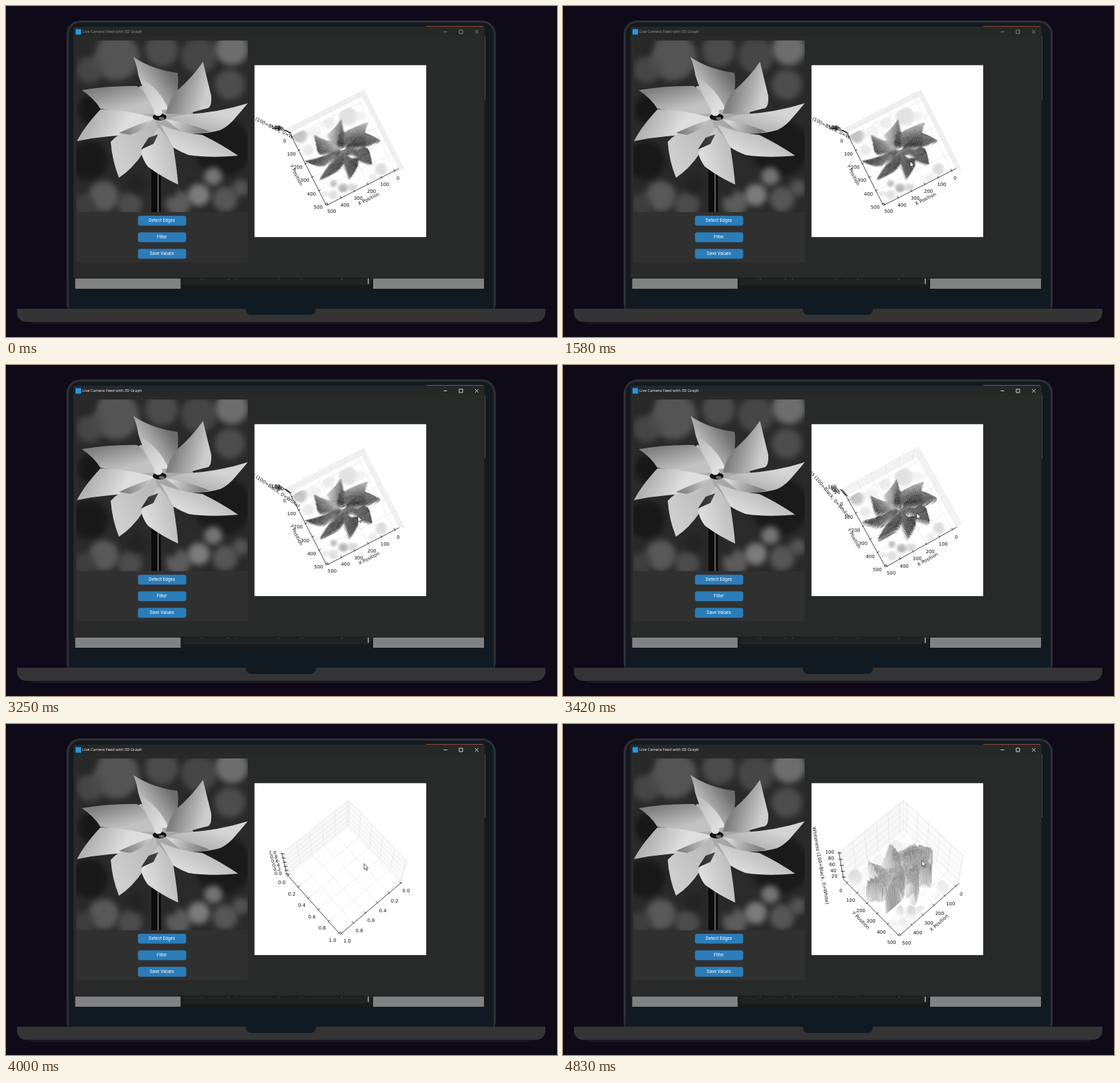
These frames come from a looping animation (800 px wide and 480 px high, 5000 ms). An HTML page with a canvas:

```html
<!DOCTYPE html>
<html lang="en">
<head>
<meta charset="utf-8">
<title>Live Camera Feed with 3D Graph</title>
<style>
html, body { margin: 0; width: 100%; height: 100%; overflow: hidden; background: #0f0a18; }
canvas { display: block; }
</style>
</head>
<body>
<canvas id="stage" width="800" height="480"></canvas>
<script>
const ctx = document.getElementById('stage').getContext('2d');
const LOOP = 5000, FPS = 12;
const PHOTO = { x: 102, y: 50, size: 249 };
const FIG = { x: 360.8, y: 85.8, size: 249.3 };
const CELLS = 62;
const PLOT_FONT = '6.8px "DejaVu Sans", sans-serif';

const clamp = (v, a = 0, b = 1) => Math.min(b, Math.max(a, v));
const mix = (a, b, k) => a + (b - a) * k;
const gray = v => { v = Math.round(clamp(v, 0, 255)); return `rgb(${v},${v},${v})`; };

// Rows are [step, value, value]; linear between rows.
function track(rows, n) {
  let i = 0;
  while (i < rows.length - 2 && rows[i + 1][0] <= n) i++;
  const p = rows[i], q = rows[i + 1];
  const k = clamp((n - p[0]) / (q[0] - p[0]));
  return [mix(p[1], q[1], k), mix(p[2], q[2], k)];
}
const POINTER = [[4, 660, 34], [7, 660, 34], [14, 574, 165], [19, 504, 225], [31, 504, 225],
  [39, 511, 219], [45, 519, 206], [52, 521, 198]];
const VIEW = [[31, 63.2, 89.2], [39, 62.8, 88.3], [44, 58, 82], [46, 50, 74], [52, 47, 64.5]];

function rect(c, x, y, w, h, color) {
  c.fillStyle = color;
  c.fillRect(x, y, w, h);
}
function round(x, y, w, h, r, color) {
  ctx.fillStyle = color;
  ctx.beginPath();
  ctx.roundRect(x, y, w, h, r);
  ctx.fill();
}
function text(str, x, y, color, font, align = 'center', angle = 0) {
  ctx.save();
  ctx.translate(x, y);
  ctx.rotate(angle);
  ctx.font = font;
  ctx.textAlign = align;
  ctx.textBaseline = 'middle';
  ctx.fillStyle = color;
  ctx.fillText(str, 0, 0);
  ctx.restore();
}

// ---- pinwheel picture ----
// Soft spots: x, y, radius, tone.
const SPOTS = [
  [160, 74, 34, 92], [226, 64, 24, 82], [280, 72, 26, 76], [328, 62, 24, 122], [325, 114, 22, 84],
  [122, 92, 20, 76], [118, 58, 14, 40], [126, 150, 22, 20], [315, 205, 42, 24], [120, 224, 28, 22],
  [142, 276, 22, 98], [114, 288, 16, 66], [180, 288, 18, 82], [250, 286, 18, 102], [301, 247, 13, 130],
  [280, 274, 16, 138], [318, 280, 18, 94], [341, 264, 12, 90], [190, 258, 14, 34], [240, 270, 8, 36]
];
// Shapes from back to front: outline, gradient from (x0,y0) to (x1,y1), first and last tone.
const BLADES = [
  ['M195 116L248 120L272 156L270 186L243 206L198 212L164 185L150 151Z', 200, 130, 250, 195, 180, 160],
  ['M185 74Q212 92 249 97Q251 110 249 123L232 150L215 150Q199 124 192 100Q190 86 185 74Z', 200, 125, 240, 98, 200, 108],
  ['M194 104Q222 118 236 150L215 152Q200 126 194 104Z', 196, 112, 232, 142, 190, 224],
  ['M286 81Q292 106 298 130Q299 144 294 148Q276 152 262 157L232 156Q236 136 249 122Q270 104 286 81Z', 248, 118, 290, 130, 128, 206],
  ['M110 122Q150 115 190 116Q203 124 217 156L190 157Q160 152 137 149Q128 134 110 122Z', 150, 117, 160, 153, 128, 194],
  ['M351 141Q342 152 334 161Q324 174 311 180Q286 187 262 184L230 166Q246 158 264 157Q310 154 351 141Z', 300, 152, 290, 184, 212, 178],
  ['M232 164Q260 168 296 182Q276 187 256 184Z', 240, 168, 285, 184, 214, 126],
  ['M103 196Q113 176 137 150Q170 150 216 162L196 182Q176 187 150 189Q126 191 103 196Z', 125, 165, 165, 188, 178, 222],
  ['M164 249Q154 224 152 197Q162 185 180 180L216 164L222 182Q204 196 199 213Q184 236 164 249Z', 156, 210, 208, 180, 206, 186],
  ['M337 217Q296 221 265 216Q252 211 243 205L224 172Q252 184 285 187Q312 200 337 217Z', 290, 188, 275, 218, 190, 218],
  ['M250 259Q226 248 206 233Q199 224 196 212L222 176Q236 192 243 205Q248 235 250 259Z', 202, 224, 246, 212, 222, 188],
  ['M196 208L207 191L221 186L214 200Z', 196, 206, 220, 187, 42, 70],
  ['M164 184Q190 172 214 164Q198 182 180 187Z', 166, 184, 212, 166, 120, 206]
];

function makePhoto() {
  const can = document.createElement('canvas');
  can.width = can.height = PHOTO.size;
  const c = can.getContext('2d');
  rect(c, 0, 0, 249, 249, '#2a2a2a');
  c.translate(-PHOTO.x, -PHOTO.y);
  c.filter = 'blur(4px)';
  for (const [x, y, r, tone] of SPOTS) {
    c.globalAlpha = 0.85;
    c.fillStyle = gray(tone);
    c.beginPath();
    c.arc(x, y, r, 0, 7);
    c.fill();
  }
  c.filter = 'none';
  c.globalAlpha = 1;
  rect(c, 211, 195, 14, 105, '#0b0b0b');
  rect(c, 220, 215, 1.5, 85, '#777');
  for (const [d, x0, y0, x1, y1, a, b] of BLADES) {
    const g = c.createLinearGradient(x0, y0, x1, y1);
    g.addColorStop(0, gray(a));
    g.addColorStop(1, gray(b));
    c.fillStyle = g;
    c.fill(new Path2D(d));
  }
  for (const [x, y, rx, ry, tone] of [[223, 161, 10, 5, 18], [221, 154, 6, 5.5, 222], [226, 163, 4, 2, 110]]) {
    c.fillStyle = gray(tone);
    c.beginPath();
    c.ellipse(x, y, rx, ry, 0, 0, 7);
    c.fill();
  }
  return can;
}
const photo = makePhoto();

// Brightness of the picture, slightly roughened, becomes the height of the surface.
function makeHeights() {
  const can = document.createElement('canvas');
  can.width = can.height = CELLS;
  const c = can.getContext('2d');
  c.imageSmoothingQuality = 'high';
  c.drawImage(photo, 0, 0, CELLS, CELLS);
  const px = c.getImageData(0, 0, CELLS, CELLS).data;
  const noise = i => { const s = Math.sin(i * 12.9898) * 43758.5; return s - Math.floor(s) - 0.5; };
  return Float32Array.from({ length: CELLS * CELLS }, (_, i) =>
    clamp((px[i * 4] - 58) / 175) * (1 + 0.22 * noise(i)));
}
const heights = makeHeights();
const height = (col, row) => heights[row * CELLS + col];

// ---- 3D plot ----
// Maps unit-cube coordinates to the stage for an azimuth and elevation in degrees.
function camera(azim, elev) {
  const a = azim * Math.PI / 180, e = elev * Math.PI / 180;
  const ca = Math.cos(a), sa = Math.sin(a), ce = Math.cos(e), se = Math.sin(e);
  return (fx, fy, fz) => {
    const x = (fx - 0.5) * 1.19, y = (fy - 0.5) * 1.19, z = (fz - 0.5) * 0.893;
    const out = x * ca + y * sa;
    const k = 1037 / (10 - ce * out - se * z);
    return [491.2 + (y * ca - x * sa) * k, 209.1 - (ce * z - se * out) * k];
  };
}
function poly(points, stroke, fill) {
  ctx.beginPath();
  points.forEach(p => ctx.lineTo(p[0], p[1]));
  if (fill) { ctx.closePath(); ctx.fillStyle = fill; ctx.fill(); }
  if (stroke) { ctx.strokeStyle = stroke; ctx.stroke(); }
}
const padded = v => (v + 0.0208) / 1.0417;
const dataPos = v => 0.06 + 0.92 * v;

function drawAxes(cam, empty) {
  const steps = [0, 1, 2, 3, 4, 5];
  const flat = steps.map(i => empty
    ? [padded(i / 5), (i / 5).toFixed(1)]
    : [dataPos(i / 5), String(i * 100)]);
  const tall = empty ? flat : [20, 40, 60, 80, 100].map(v => [(v - 11) / 92, String(v)]);

  ctx.lineWidth = 0.6;
  poly([cam(0, 0, 0), cam(0, 1, 0), cam(0, 1, 1), cam(0, 0, 1)], '#efefef', '#fbfbfb');
  poly([cam(0, 0, 0), cam(1, 0, 0), cam(1, 0, 1), cam(0, 0, 1)], '#efefef', '#f8f8f8');
  poly([cam(0, 0, 0), cam(1, 0, 0), cam(1, 1, 0), cam(0, 1, 0)], '#efefef');
  const grid = '#e0e0e0';
  for (const [f] of flat) {
    poly([cam(f, 1, 0), cam(f, 0, 0), cam(f, 0, 1)], grid);
    poly([cam(1, f, 0), cam(0, f, 0), cam(0, f, 1)], grid);
  }
  for (const [f] of tall) poly([cam(1, 0, f), cam(0, 0, f), cam(0, 1, f)], grid);

  ctx.lineWidth = 0.75;
  poly([cam(0, 1, 0), cam(1, 1, 0)], '#111');
  poly([cam(1, 0, 0), cam(1, 1, 0)], '#111');
  poly([cam(1, 0, 0), cam(1, 0, 1)], '#111');

  // Each axis: a point at fraction f, pushed outwards by d.
  const onX = (f, d) => cam(f, 1 + d, -Math.max(d, 0));
  const onY = (f, d) => cam(1 + d, f, -Math.max(d, 0));
  const onZ = (f, d) => cam(1 + d, -d, f);
  const tickX = (f, d) => cam(f, 1 + d, 0), tickY = (f, d) => cam(1 + d, f, 0);
  for (const [place, tick, list] of [[onX, tickX, flat], [onY, tickY, flat], [onZ, onZ, tall]]) {
    for (const [f, label] of list) {
      poly([tick(f, -0.022), tick(f, 0.012)], '#111');
      const p = place(f, place === onZ ? 0.075 : 0.105);
      text(label, p[0], p[1], '#111', PLOT_FONT);
    }
  }
  if (empty) return;
  const name = (str, place, from, to) => {
    const p = place(0.5, 0.175), a = place(from, 0), b = place(to, 0);
    text(str, p[0], p[1], '#111', PLOT_FONT, 'center', Math.atan2(b[1] - a[1], b[0] - a[0]));
  };
  name('X Position', onX, 1, 0);
  name('Y Position', onY, 0, 1);
  name('Whiteness (100=Black, 0=White)', onZ, 1, 0);
}

function drawSurface(cam, elev) {
  const last = CELLS - 1;
  const depth = mix(112, 205, clamp((elev - 64.5) / 20));
  const at = (i, j) => cam(dataPos(i / last), dataPos(j / last), 0.02 + 0.82 * height(i, j));
  ctx.lineWidth = 0.4;
  for (let i = 0; i < last; i++) {
    for (let j = 0; j < last; j++) {
      const h = [height(i, j), height(i + 1, j), height(i + 1, j + 1), height(i, j + 1)];
      const mean = (h[0] + h[1] + h[2] + h[3]) / 4;
      if (mean < 0.01) continue;
      const slope = h[0] + h[1] - h[2] - h[3];
      const weave = ((i + j) % 2 ? 14 : -14) * mean;
      const color = gray(255 - depth * mean - 34 * slope + weave);
      poly([at(i, j), at(i + 1, j), at(i + 1, j + 1), at(i, j + 1)], color, color);
    }
  }
}

function drawPlot(n) {
  rect(ctx, FIG.x, FIG.y, FIG.size, FIG.size, '#fff');
  if (n === 45 || n === 55) return;
  const [azim, elev] = track(VIEW, n);
  const cam = camera(azim, elev), empty = n > 45 && n < 55;
  ctx.save();
  ctx.beginPath();
  ctx.rect(FIG.x, FIG.y, FIG.size, FIG.size);
  ctx.clip();
  drawAxes(cam, empty);
  if (!empty) drawSurface(cam, elev);
  ctx.restore();
}

// ---- laptop and window ----
function drawLaptop() {
  rect(ctx, 0, 0, 800, 480, '#0f0a18');
  round(28, 450, 743, 11, [0, 0, 12, 12], '#19171e');
  round(88, 21, 623, 430, 20, '#2e3033');
  round(91, 24, 617, 430, 17, '#121a21');
  round(16, 439, 767, 19, [0, 0, 13, 13], '#343434');
  round(348, 438, 102, 10, [0, 0, 8, 8], '#121a21');
}

function drawDesktop() {
  rect(ctx, 97, 29, 599, 382, '#17191a');
  rect(ctx, 610, 29, 83, 1, '#8a4a34');
  rect(ctx, 695, 44, 0.8, 92, '#5c5e60');
  rect(ctx, 100.5, 395, 153, 15, '#808284');
  rect(ctx, 533, 395, 161, 15, '#808284');
  rect(ctx, 257, 395, 272, 10, '#202223');
  text('applied to graph      values (plot)   y, ax   rotating surface, g', 278, 393.6,
    '#8a8a8a', '6.5px "DejaVu Sans Mono", monospace', 'left');
  rect(ctx, 525, 395, 2, 8, '#8a8c8d');
}

function drawControls(color) {
  ctx.strokeStyle = color;
  ctx.lineWidth = 0.8;
  ctx.beginPath();
  ctx.moveTo(635.5, 37.5); ctx.lineTo(640.5, 37.5);
  ctx.rect(658, 35, 5, 5);
  ctx.moveTo(681, 35); ctx.lineTo(686, 40);
  ctx.moveTo(686, 35); ctx.lineTo(681, 40);
  ctx.stroke();
}

function drawWindow(n) {
  const focus = clamp((n - 23) / 4);
  rect(ctx, 98, 30, 596.5, 365, '#282a29');
  rect(ctx, 98, 30, 596.5, 14, '#262828');
  rect(ctx, 98, 394.4, 597, 0.8, '#111');
  if (n >= 4 && n < 8) rect(ctx, 649, 30, 23, 13, n === 4 ? '#2d2f2f' : '#343636');
  rect(ctx, 101, 33.5, 8, 8, '#1f9ae6');
  const tone = gray(mix(150, 250, focus));
  text('Live Camera Feed with 3D Graph', 111, 38, tone, '5.7px "Open Sans", sans-serif', 'left');
  drawControls(tone);

  rect(ctx, 101.5, 50, 249.5, 321.5, '#303031');
  ctx.drawImage(photo, PHOTO.x, PHOTO.y);
  ['Detect Edges', 'Filter', 'Save Values'].forEach((label, i) => {
    const y = 304.2 + 24 * i;
    round(191.6, y, 70, 14.2, 3, '#2b7db9');
    text(label, 226.3, y + 7.3, '#fff', '6.5px Roboto, sans-serif');
  });
}

const ARROW = new Path2D('M0 0V8.6L2 6.8L3.4 9.8L4.7 9.2L3.4 6.3H6Z');
function drawPointer(n) {
  if (n < 4) return;
  const [x, y] = track(POINTER, n);
  ctx.save();
  ctx.translate(x, y);
  ctx.fillStyle = '#fff';
  ctx.fill(ARROW);
  ctx.strokeStyle = '#222';
  ctx.lineWidth = 0.7;
  ctx.stroke(ARROW);
  ctx.restore();
}

let shown = -1;
function frame(now) {
  const n = Math.floor((now % LOOP + 4) * FPS / 1000) % (LOOP * FPS / 1000);
  if (n !== shown) {
    shown = n;
    drawLaptop();
    drawDesktop();
    drawWindow(n);
    drawPlot(n);
    drawPointer(n);
  }
  requestAnimationFrame(frame);
}
frame(performance.now());
</script>
</body>
</html>
```
